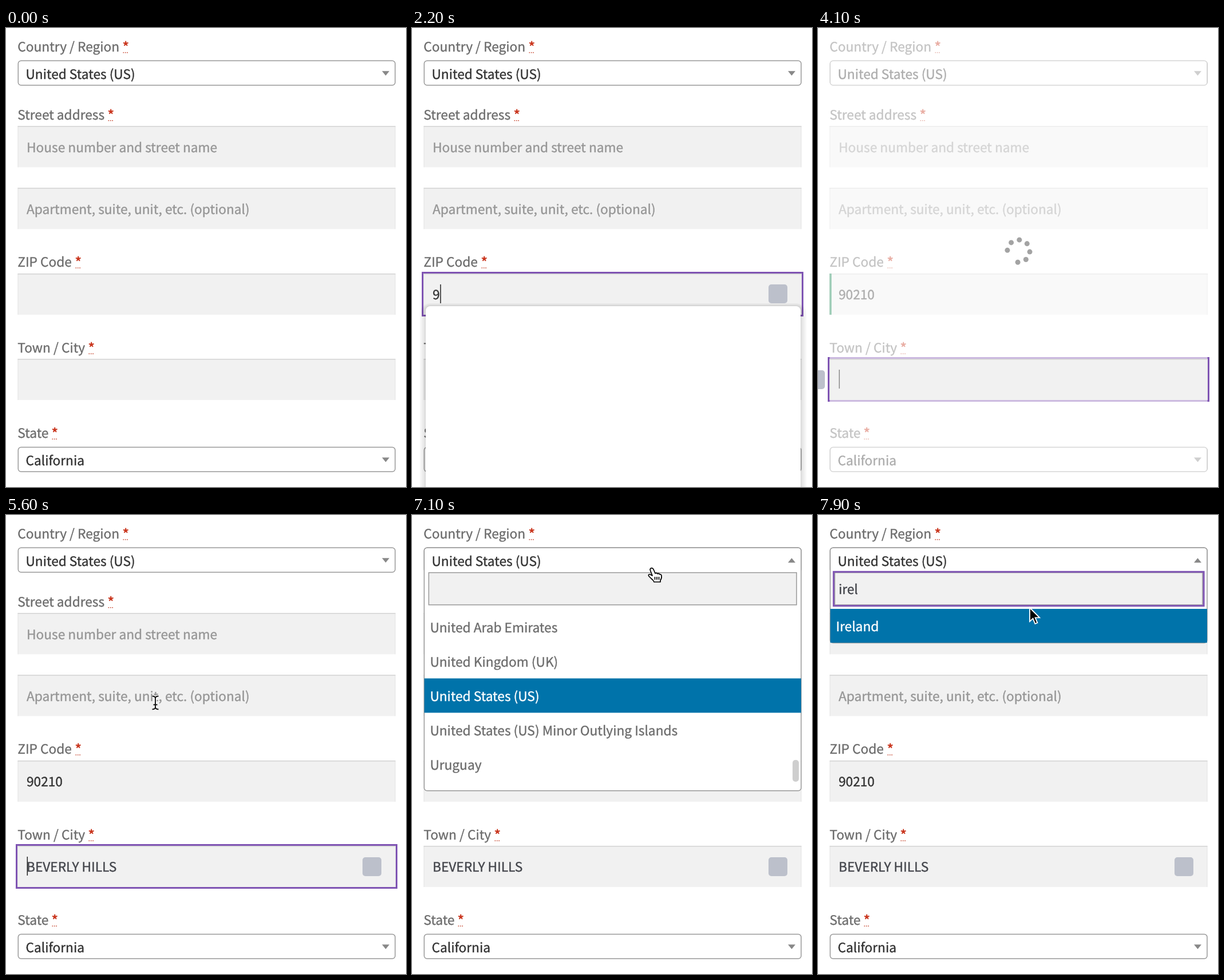
Write an HTML page that moves like this. It is 699 px wide and 802 px high and loops after 8 s.

```html
<!DOCTYPE html>
<html lang="en">
<head>
<meta charset="utf-8">
<title>Checkout address form</title>
<style>
  html, body { margin: 0; width: 100%; height: 100%; overflow: hidden; background: #fff; }
  svg { display: block; width: 699px; height: 802px; }
  text {
    font: 22.7px "Noto Sans CJK SC", "Noto Sans CJK JP", "Noto Sans CJK", "Open Sans", sans-serif;
    text-rendering: geometricPrecision;
    white-space: pre;
    stroke-width: .4px;
  }
</style>
</head>
<body>
<svg id="stage" viewBox="0 0 699 802"></svg>
<script>
const LOOP = 8000, TICK = 100;
const LEFT = 20.5, RIGHT = 680.5, WIDTH = RIGHT - LEFT;
const PURPLE = '#7f54b3', BLUE = '#0073aa', BORDER = '#999', FIELD = '#f1f1f1';
const LABEL = '#6d6d6d', INK = '#43454b', DARK = '#333', HINT = '#969696';
const ZIP_Y = 429, TOWN_Y = 578, FIELD_H = 72;
const DIGIT = 12.6;
const BLUR = 6600, OPEN = 7000;

const stage = document.getElementById('stage');
const within = (t, a, b) => t >= a && t < b;
const lerp = (a, b, k) => a + (b - a) * k;

const rect = (x, y, w, h, fill, extra = '') =>
  `<rect x="${x}" y="${y}" width="${w}" height="${h}" fill="${fill}" ${extra}/>`;
const text = (x, y, fill, str, extra = '') =>
  `<text x="${x}" y="${y}" fill="${fill}" stroke="${fill}" ${extra}>${str}</text>`;
const line = (d, stroke, width, extra = '') =>
  `<path d="${d}" fill="none" stroke="${stroke}" stroke-width="${width}" ${extra}/>`;

const label = (y, str, starX) =>
  text(20.3, y, LABEL, str) +
  text(starX, y, '#c9341c', '*', 'style="font-weight:700;stroke:none"') +
  line(`M${starX + 1} ${y + 2.3}h9`, '#c9503a', 1.5, 'stroke-dasharray="1.7 1.7"');

const field = y =>
  rect(LEFT, y, WIDTH, FIELD_H, FIELD) +
  line(`M${LEFT + .5} ${y + FIELD_H}V${y}M${RIGHT - .5} ${y + FIELD_H}V${y}`, '#e4e4e4', 1) +
  line(`M${LEFT} ${y + .7}H${RIGHT}`, '#d3d3d3', 1.4);

const outline = (x, y, w, h) =>
  rect(x, y, w, h, 'none', `stroke="${PURPLE}" stroke-width="3"`);
const fieldOutline = y => outline(18.5, y - 1.5, 664, FIELD_H + 3);

const selectBox = (y, h, str, up) => {
  const a = y + 18;
  const arrow = up ? `M657 ${a + 8}h13l-6.5 -8z` : `M657 ${a}h13l-6.5 8z`;
  return rect(21.3, y, 658.7, h, '#fff', `rx="5" stroke="${BORDER}" stroke-width="1.5"`) +
    text(34.5, y + 31.5, DARK, str) + `<path d="${arrow}" fill="#888"/>`;
};

const badge = (x, y) => rect(x, y, 33, 33, '#bcc0cb', 'rx="5"');
const caret = (x, y, color = '#222') => line(`M${x} ${y}v33`, color, 1.5);

const beamPath = 'M-5.5 -11.5Q0 -11.5 0 -7.5Q0 -11.5 5.5 -11.5M0 -8V8' +
  'M-5.5 11.5Q0 11.5 0 7.5Q0 11.5 5.5 11.5M-3.5 3.5H3.5';
const cursors = {
  arrow: '<path d="M0 0V24L5.6 18.9 9.4 28 13.4 26.3 9.6 17.4H17.2Z" fill="#000" stroke="#fff" stroke-width="1.8"/>',
  beam: line(beamPath, '#fff', 4.4) + line(beamPath, '#111', 1.9),
  hand: '<g transform="translate(-8 -1)" stroke="#000" stroke-width="1.7" stroke-linejoin="round">' +
    '<path fill="#fff" d="M5 2.3Q8 .5 10 4L13 11Q15 9.3 17 11.8Q19 10.3 21 12.8Q23.5 12.3 24 15Q24.5 20 22 23V26H11Q10 23 6 20L2 16Q0 13 3.5 12.5L8 15 4.5 6Q3.5 3.5 5 2.3Z"/>' +
    '<path fill="none" d="M12.5 17V22M16 17V22M19.5 17V22"/></g>'
};

// time, shape, x, y: positions move linearly to the next key, no shape hides it
const track = [
  [600, 'hand', 332, 743], [700, 'beam', 334, 580], [800, 'arrow', 331, 371],
  [900, 'arrow', 331, 371], [1000, 'arrow', 298, 402], [1100, 'beam', 271, 443],
  [1200, 'beam', 251, 460], [1900], [5400, 'beam', 252, 440], [5600, 'beam', 261, 328],
  [5900, 'beam', 330, 210], [6200, 'arrow', 378, 129], [6400, 'hand', 418, 77],
  [6700, 'hand', 420, 92], [7200], [7700, 'beam', 394, 141],
  [7800, 'beam', 380, 148], [7900, 'arrow', 370, 162]
];

function pointer(t) {
  const i = track.findLastIndex(k => k[0] <= t);
  if (i < 0 || !track[i][1]) return '';
  const [t0, shape, x, y] = track[i];
  const next = track[i + 1];
  const k = next && next[1] ? (t - t0) / (next[0] - t0) : 0;
  const px = k ? lerp(x, next[2], k) : x;
  const py = k ? lerp(y, next[3], k) : y;
  return `<g transform="translate(${px} ${py})">${cursors[shape]}</g>`;
}

function typed(str, times, t) {
  return str.slice(0, times.filter(at => at <= t).length);
}

function zipField(t) {
  const zip = typed('90210', [1900, 2300, 3000, 3100, 3400], t);
  const focus = within(t, 1300, 3800);
  const lit = within(t, 1300, 3000) || within(t, 3100, 3600);
  return label(417, 'ZIP Code', 120.5) + field(ZIP_Y) +
    (within(t, 3800, 4400) ? rect(LEFT, ZIP_Y, 3.2, FIELD_H, '#0f834d') : '') +
    text(36, 474, DARK, zip) +
    (focus ? fieldOutline(ZIP_Y) + badge(623, 448) : '') +
    (focus && lit ? caret(37.3 + zip.length * DIGIT, 448) : '');
}

function townField(t) {
  const lit = within(t, 3800, 4800) || within(t, 5400, 5900);
  return label(567, 'Town / City', 143.5) + field(TOWN_Y) +
    (t >= 4400 ? text(36, 622.7, INK, 'BEVERLY HILLS') : '') +
    (within(t, 3800, BLUR) ? fieldOutline(TOWN_Y) : '') +
    (within(t, 3800, 4400) ? badge(-21, 598) : '') +
    (t >= 5200 ? badge(623, 598) : '') +
    (lit ? caret(37.3, 597, within(t, 3900, 4400) ? '#888' : '#222') : '');
}

// suggestion panel that opens on the first digit and fades out on the second
function suggestions(t) {
  const k = Math.min(1, (t - 1800) / 200, (2600 - t) / 300);
  if (k <= 0) return '';
  return `<g opacity="${k}">` +
    [10, 7, 4, 2].map(d => rect(24 - d, 486 - d / 2, 655 + 2 * d, 340, '#000',
      `rx="${8 + d}" opacity=".035"`)).join('') +
    rect(24, 486, 655, 340, '#fff', 'rx="8"') + '</g>';
}

function loading(t) {
  if (!within(t, 3900, 4400)) return '';
  const k = Math.min(1, (t - 3800) / 200, (4400 - t) / 200);
  const gap = 139 + (t - 4100) * .48;
  let dots = '';
  for (let i = 1; i < 8; i++) {
    const a = (gap + i * 45) * Math.PI / 180;
    dots += `<circle cx="${350.5 + 19.6 * Math.cos(a)}" cy="${389.7 + 19.6 * Math.sin(a)}" r="4.5"/>`;
  }
  const veil = `M${LEFT} 0H${RIGHT}V802H${LEFT}ZM${LEFT} ${TOWN_Y}H${RIGHT}V${TOWN_Y + FIELD_H}H${LEFT}Z`;
  return `<path d="${veil}" fill="#fff" fill-rule="evenodd" opacity="${.6 * k}"/>` +
    `<g fill="#a3a3a3" opacity="${k}">${dots}</g>`;
}

function dropdown(t) {
  if (t < OPEN) return '';
  const query = typed('irel', [7200, 7300, 7400, 7500], t);
  const found = query.length > 2;
  const rows = found ? ['Ireland'] : ['United Arab Emirates', 'United Kingdom (UK)',
    'United States (US)', 'United States (US) Minor Outlying Islands', 'Uruguay'];
  const active = found ? 0 : 2;
  const top = found ? 164 : 165.5;
  const list = rows.map((name, i) => {
    const y = top + i * 60;
    const on = i === active;
    return (on ? rect(21.5, y, 658.5, found ? 59.2 : 60, BLUE) : '') +
      text(31.4, y + 39, on ? '#fff' : LABEL, name);
  }).join('');
  const caretX = 37 + [0, 6.3, 15, 27.6, 34][query.length];
  return selectBox(57.3, found ? 166.2 : 424.5, 'United States (US)', true) +
    rect(29.3, 100.7, 642.7, 56.3, FIELD, `stroke="${BORDER}" stroke-width="1.5"`) +
    list +
    (found ? '' : rect(665, 428, 11, 38, '#cecece', 'rx="5"')) +
    (query ? outline(27.3, 99.3, 646.8, 59.4) + text(36, 137.7, INK, query) : '') +
    (within(t, 7200, 7700) ? caret(caretX, 112) : '');
}

function scene(t) {
  return rect(0, 0, 699, 802, '#fff') +
    label(40.7, 'Country / Region', 203.5) +
    selectBox(57.3, 42.7, 'United States (US)') +
    label(159.5, 'Street address', 177.5) +
    field(171.3) + text(36, 216.7, HINT, 'House number and street name') +
    field(279.3) + text(36, 325, HINT, 'Apartment, suite, unit, etc. (optional)') +
    zipField(t) + townField(t) +
    label(716, 'State', 79.5) +
    selectBox(732.5, 42.7, 'California') +
    suggestions(t) + loading(t) + dropdown(t) + pointer(t);
}

let shown = -1;
const start = performance.now();
function frame(now) {
  const t = Math.floor((Math.max(0, now - start) % LOOP) / TICK) * TICK;
  if (t !== shown) {
    stage.innerHTML = scene(t);
    shown = t;
  }
  requestAnimationFrame(frame);
}
frame(start);
</script>
</body>
</html>
```
